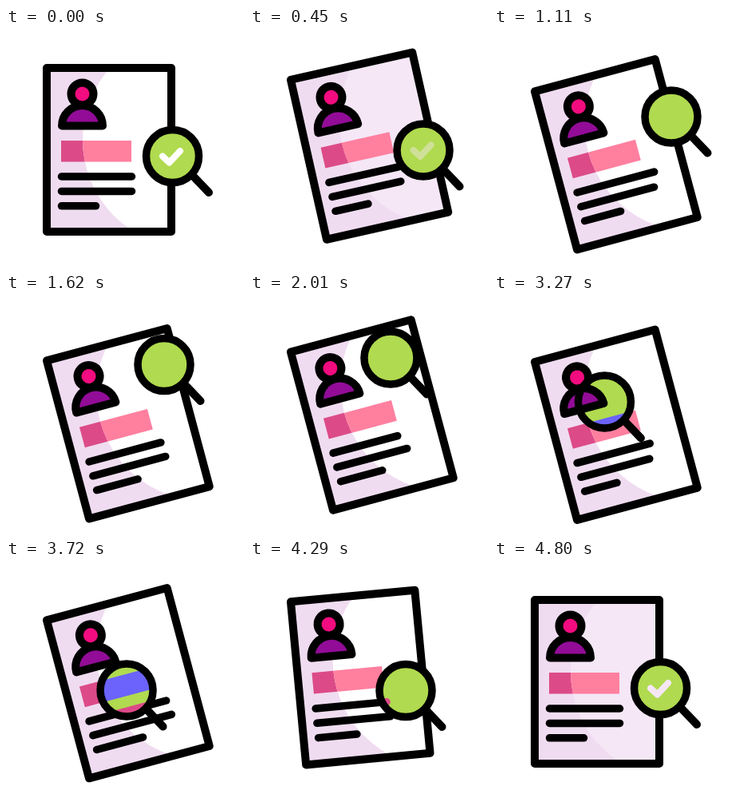
An HTML page with a canvas for the animation above (5130 ms loop, 298 by 298 pixels).

```html
<!DOCTYPE html>
<html lang="en">
<head>
<meta charset="utf-8">
<title>Document review</title>
<style>
  html, body { margin: 0; height: 100%; overflow: hidden; background: #fff; }
  canvas { display: block; width: 298px; height: 298px; }
</style>
</head>
<body>
<canvas id="stage" width="298" height="298"></canvas>
<script>
const ctx = document.getElementById('stage').getContext('2d');
const LOOP = 5130, END = 4800, TAU = Math.PI * 2;
const GREEN = '#b0da4f', PINK = '#dc4b87', TINT = '#f5e7f6';

const clamp = x => Math.max(0, Math.min(1, x));
const ramp = (t, a, b) => clamp((t - a) / (b - a));
const smooth = x => x * x * (3 - 2 * x);
const wave = (t, peak, period) => Math.cos((t - peak) / period * TAU);

// Smooth curve through [time, value] keys, at rest at both ends.
function track(keys, t) {
  const last = keys.length - 1;
  if (t >= keys[last][0]) return keys[last][1];
  const i = keys.findIndex(k => k[0] > t) - 1;
  const slope = j => j < 1 || j >= last ? 0 :
    (keys[j + 1][1] - keys[j - 1][1]) / (keys[j + 1][0] - keys[j - 1][0]);
  const [t0, a] = keys[i], [t1, b] = keys[i + 1];
  const d = t1 - t0, u = (t - t0) / d, s = smooth(u);
  return a + (b - a) * s + d * u * (1 - u) * (slope(i) * (1 - u) - slope(i + 1) * u)
    ;
}

const times = [0, 450, 1110, 2010, 2820, 3720, 4600];
const keyed = values => values.map((v, i) => [times[i], v]);
const lensX = keyed([208.5, 217, 222, 176, 138, 151, 208.5]);
const lensY = keyed([160.5, 153, 111, 80, 103, 163, 160.5]);
const line2 = keyed([88, 88, 95, 91, 76, 102, 88]);
const line3 = keyed([43, 42, 46.6, 54, 25, 60, 43]);

function stroke(width, color = '#000') {
  ctx.lineWidth = width;
  ctx.strokeStyle = color;
  ctx.stroke();
}

function polyline(points, width, color) {
  ctx.beginPath();
  points.forEach(p => ctx.lineTo(...p));
  stroke(width, color);
}

function disc(x, y, r, fill) {
  ctx.beginPath();
  ctx.arc(x, y, r, 0, TAU);
  ctx.fillStyle = fill;
  ctx.fill();
}

function box(x, y, w, h, fill) {
  ctx.fillStyle = fill;
  ctx.fillRect(x, y, w, h);
}

// Runs draw() with the curved highlight on the right of the page as clip.
function inHighlight(draw) {
  ctx.save();
  ctx.beginPath();
  ctx.arc(231, 140, 135, 0, TAU);
  ctx.clip();
  draw();
  ctx.restore();
}

function person(sway) {
  disc(95.5 + sway, 82.5, 14, '#f20c7f');
  stroke(10);
  ctx.beginPath();
  ctx.arc(95.5, 122.5, 25.5, Math.PI, TAU);
  ctx.closePath();
  ctx.fillStyle = '#920c97';
  ctx.fill();
  stroke(10);
}

function lines(lengths, color) {
  lengths.forEach((w, i) => {
    const y = 186 + i * 18.4;
    polyline([[69.5, y], [69.5 + w, y]], 9.5, color);
  });
}

function draw(t) {
  const tilt = smooth(ramp(t, 0, 600)) * (1 - smooth(ramp(t, 3880, 4570)));
  const lift = (26 + 9 * wave(t, 1450, 1800)) * (t < 2400 ? tilt : tilt * tilt);
  const beat = wave(t, 1110, 2610);
  const sway = 3.6 * beat * tilt;
  const lengths = [88 + (1.5 + 10.5 * beat) * tilt, track(line2, t), track(line3, t)];
  const checkAlpha = t < 2400 ? 1 - ramp(t, 0, 800) : ramp(t, 4300, END);
  const paper = (t >= 30 && t < 800) || t >= 4300 ? TINT : '#fff';
  const x = track(lensX, t), y = track(lensY, t);

  function onPage(paint) {
    ctx.save();
    ctx.translate(51, 50 + lift);
    ctx.rotate(-15 * tilt * Math.PI / 180);
    ctx.translate(-51, -50);
    paint();
    ctx.restore();
  }

  box(0, 0, 298, 298, '#fff');
  ctx.lineCap = ctx.lineJoin = 'round';

  onPage(() => {
    box(51, 50, 156, 205, '#f0dcf1');
    box(69, 141, 88, 26.5, PINK);
    ctx.save();
    ctx.beginPath();
    ctx.rect(51, 50, 156, 205);
    ctx.clip();
    inHighlight(() => {
      box(51, 50, 156, 205, paper);
      box(69, 141, 88, 26.5, '#ff7f9f');
    });
    ctx.restore();
    person(sway);
    lines(lengths);
    ctx.beginPath();
    ctx.rect(51, 50, 156, 205);
    stroke(10);
  });

  // The glass hides the paper and recolours the text blocks beneath it.
  polyline([[x + 24, y + 23], [x + 45.5, y + 45.5]], 10);
  ctx.save();
  disc(x, y, 33, GREEN);
  ctx.clip();
  onPage(() => {
    person(sway);
    box(69, 141, 88, 26.5, '#6b63fb');
    lines(lengths, PINK);
  });
  if (t < 1500 || t > 4300) disc(x, y, 33, GREEN);
  ctx.restore();
  ctx.beginPath();
  ctx.arc(x, y, 33, 0, TAU);
  stroke(9.5);

  ctx.globalAlpha = checkAlpha;
  polyline([[x - 12.5, y], [x - 4, y + 8], [x + 9.5, y - 6.5]], 8, paper);
  ctx.globalAlpha = 1;
}

const start = performance.now();
function frame() {
  draw(Math.min((performance.now() - start) % LOOP, END));
  requestAnimationFrame(frame);
}
frame();
</script>
</body>
</html>
```
